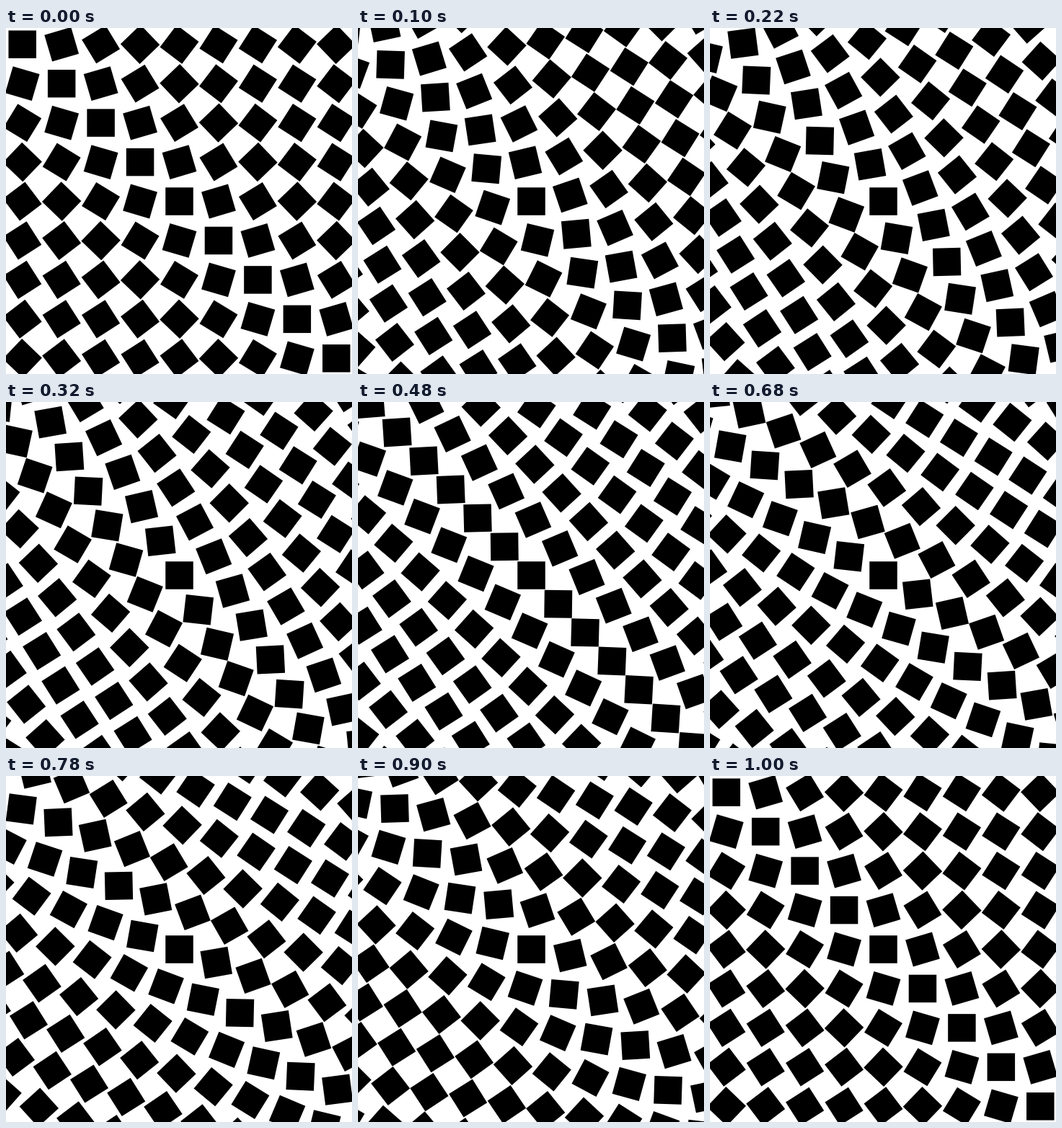
An HTML page for the animation above (1.02 s loop, 480 px wide and 480 px high).

```html
<!DOCTYPE html>
<html lang="en">
<head>
<meta charset="utf-8">
<title>Turning squares</title>
<style>
  html, body { margin: 0; width: 100%; height: 100%; overflow: hidden; background: #fff; }
  svg { display: block; width: 100vw; height: 100vh; }
</style>
</head>
<body>
<svg id="stage" viewBox="0 0 480 480"></svg>
<script>
const LOOP = 1020, STEP = 20, TURN = 1000;
const CENTER = 240.5, SIDE = 38.5, PITCH = SIDE * Math.SQRT2, REACH = 7;
const SWING = 58, HALF_WAVE = 11 * PITCH;

const stage = document.getElementById('stage');
const squares = [];
for (let row = -REACH; row <= REACH; row++) {
  for (let col = -REACH; col <= REACH; col++) {
    const rect = document.createElementNS('http://www.w3.org/2000/svg', 'rect');
    rect.setAttribute('x', -SIDE / 2);
    rect.setAttribute('y', -SIDE / 2);
    rect.setAttribute('width', SIDE);
    rect.setAttribute('height', SIDE);
    stage.append(rect);
    squares.push({ rect, x: col * PITCH, y: row * PITCH });
  }
}

// The tilt depends only on where a square is relative to the main diagonal.
const tiltAt = (x, y) => -SWING * Math.sin(Math.PI * (x - y) / HALF_WAVE);

function draw(ms) {
  const time = Math.floor((ms % LOOP) / STEP) * STEP;
  const turn = -Math.PI / 2 * Math.min(time / TURN, 1);
  const cos = Math.cos(turn), sin = Math.sin(turn);
  for (const { rect, x, y } of squares) {
    const px = x * cos - y * sin, py = x * sin + y * cos;
    rect.setAttribute('transform',
      `translate(${CENTER + px} ${CENTER + py}) rotate(${tiltAt(px, py)})`);
  }
}

const start = performance.now();
function tick() {
  draw(performance.now() - start);
  requestAnimationFrame(tick);
}
draw(0);
requestAnimationFrame(tick);
</script>
</body>
</html>
```
